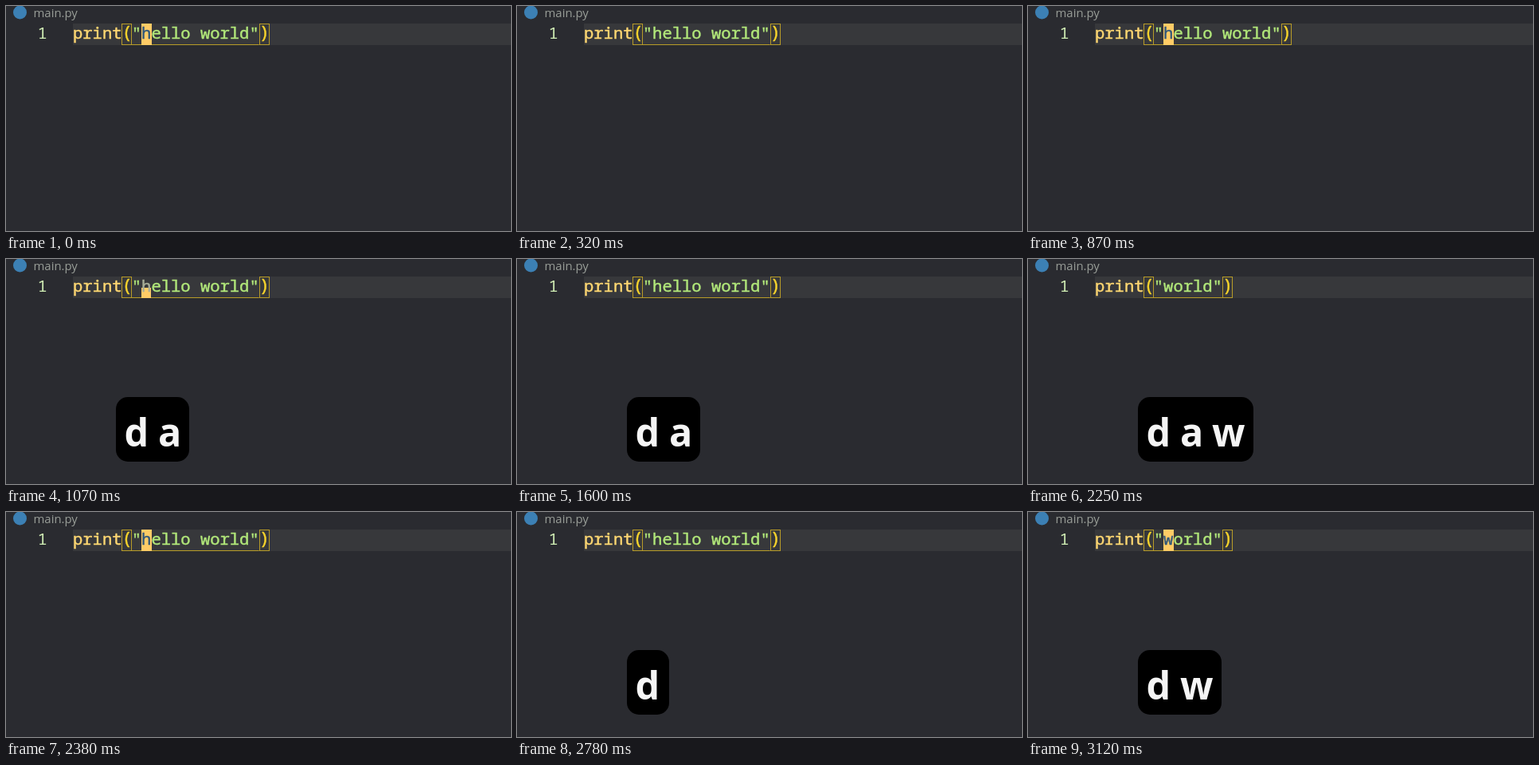
Animation of 634x282 px, one loop 3450 ms. Source, as an HTML page with a canvas:

```html
<!DOCTYPE html>
<html lang="en">
<head>
<meta charset="utf-8">
<title>Deleting a word</title>
<style>
  html, body { margin: 0; width: 100%; height: 100%; overflow: hidden; background: #2a2b30; }
  canvas { display: block; }
</style>
</head>
<body>
<canvas id="stage" width="634" height="282"></canvas>
<script>
const ctx = document.getElementById("stage").getContext("2d");
const LOOP = 3450;
const CELL = 12.3;
const CODE_X = 84;
const BASELINE = 41;
const CODE_FONT = '20.5px "Noto Sans Mono", monospace';
const BRACKET_FONT = '22px "Noto Sans Mono", monospace';
const KEY_FONT = 'bold 48.5px "Open Sans", "Noto Sans", sans-serif';
const LABEL_FONT = '14.9px "Open Sans", "Noto Sans", sans-serif';

const COLORS = {
  background: "#2a2b30", line: "#37383b", label: "#999e98", number: "#d0eeb4",
  call: "#ffd872", string: "#b2e87a", bracket: "#f8d52c", border: "#b89c28",
  cursor: "#ffcc66", covered: "#31587a", pending: "#a8ae98", icon: "#3c80b4"
};

const PILL_WIDTH = { d: 53, da: 92, daw: 145, dw: 105 };

// Each state holds until the next one starts.
const timeline = [
  { at: 0, text: "hello world", cursor: "block", keys: "" },
  { at: 320, text: "hello world", cursor: "off", keys: "" },
  { at: 870, text: "hello world", cursor: "block", keys: "" },
  { at: 940, text: "hello world", cursor: "off", keys: "d" },
  { at: 1070, text: "hello world", cursor: "half", keys: "da" },
  { at: 1600, text: "hello world", cursor: "off", keys: "da" },
  { at: 1670, text: "hello world", cursor: "off", keys: "daw" },
  { at: 1740, text: "world", cursor: "block", keys: "daw" },
  { at: 2250, text: "world", cursor: "off", keys: "daw" },
  { at: 2380, text: "hello world", cursor: "block", keys: "" },
  { at: 2710, text: "hello world", cursor: "block", keys: "d" },
  { at: 2780, text: "hello world", cursor: "off", keys: "d" },
  { at: 3060, text: "hello world", cursor: "off", keys: "dw" },
  { at: 3120, text: "world", cursor: "block", keys: "dw" }
];

const column = n => CODE_X + n * CELL;

function rect(x, y, w, h, color) {
  ctx.fillStyle = color;
  ctx.fillRect(x, y, w, h);
}

function write(text, x, y, font, color) {
  ctx.font = font;
  ctx.fillStyle = color;
  ctx.fillText(text, x, y);
}

// A thin outline gives the code its medium weight.
function code(text, col, color, font = CODE_FONT) {
  write(text, column(col), BASELINE, font, color);
  ctx.strokeStyle = color;
  ctx.lineWidth = 0.45;
  ctx.strokeText(text, column(col), BASELINE);
}

function bracket(char, col) {
  ctx.strokeStyle = COLORS.border;
  ctx.lineWidth = 1;
  ctx.strokeRect(Math.floor(column(col) + 0.4) + 0.5, 22.5, 12, 26);
  code(char, col, COLORS.bracket, BRACKET_FONT);
}

function drawHeader() {
  ctx.fillStyle = COLORS.icon;
  ctx.beginPath();
  ctx.arc(17.5, 8, 8.5, 0, Math.PI * 2);
  ctx.fill();
  write("main.py", 34.5, 14, LABEL_FONT, COLORS.label);
}

function drawCode({ text, cursor }) {
  const close = 7 + text.length + 1;
  rect(CODE_X, 22, 550, 27, COLORS.line);
  write("1", 39.5, BASELINE, CODE_FONT, COLORS.number);
  code("print", 0, COLORS.call);
  rect(158, 48, column(close) - 158, 1, COLORS.border);
  bracket("(", 5);
  bracket(")", close);

  if (cursor === "block") rect(170, 22, 13, 27, COLORS.cursor);
  if (cursor === "half") rect(170, 36, 12, 13, COLORS.cursor);
  const first = { block: COLORS.covered, half: COLORS.pending, off: COLORS.string }[cursor];
  code('"', 6, COLORS.string);
  code(text[0], 7, first);
  code(text.slice(1) + '"', 8, COLORS.string);
}

function drawKeys(keys) {
  if (!keys) return;
  ctx.fillStyle = "#000";
  ctx.beginPath();
  ctx.roundRect(138, 173, PILL_WIDTH[keys], 81, 15);
  ctx.fill();
  let x = 148.5;
  for (const key of keys) {
    write(key, x, 235, KEY_FONT, "#f5f5f5");
    x += key === "d" ? 42.5 : 40;
  }
}

function draw(now) {
  const time = now % LOOP;
  const state = timeline.findLast(step => step.at <= time);
  rect(0, 0, 634, 282, COLORS.background);
  drawHeader();
  drawCode(state);
  drawKeys(state.keys);
}

function frame() {
  draw(performance.now());
  requestAnimationFrame(frame);
}
frame();
</script>
</body>
</html>
```
